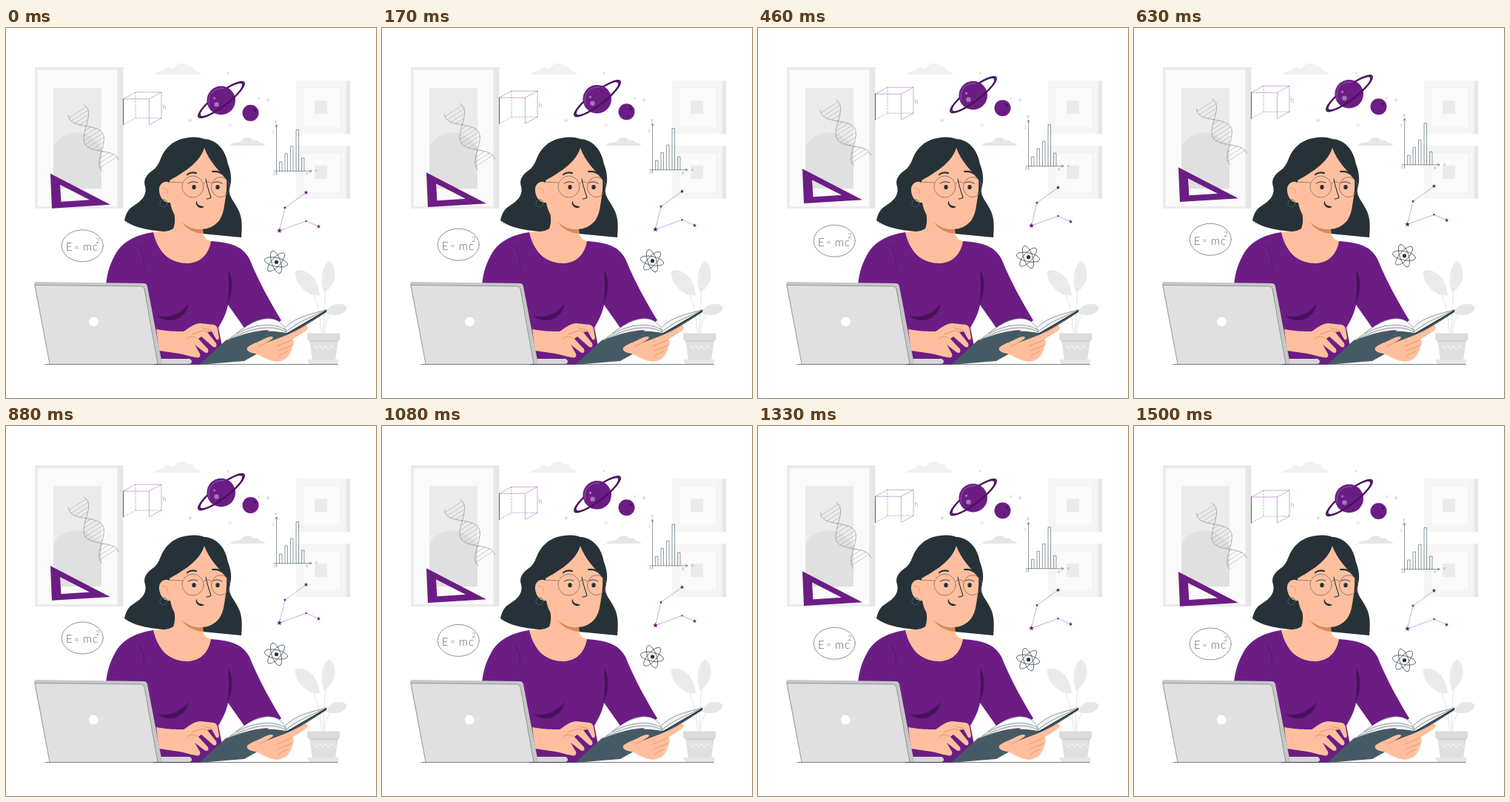
An HTML page with a canvas that plays this animation: 500x500 px, repeating every 1.54 s.

```html
<!DOCTYPE html>
<html lang="en">
<head>
<meta charset="utf-8">
<title>Studying</title>
<style>
  html, body { margin: 0; width: 100%; height: 100%; overflow: hidden; background: #fff; }
  canvas { display: block; width: 100vw; height: 100vh; }
</style>
</head>
<body>
<canvas id="stage" width="500" height="500"></canvas>
<script>
const ctx = document.getElementById('stage').getContext('2d');
const LOOP = 1540, STEPS = 37, PEAK = 708, LIFT = 9;
const PURPLE = '#6b1d84', DEEP = '#49125c', DARK = '#263238', SLATE = '#455a64';
const SKIN = '#ffbf9e', SHADE = '#dc8b5d', LILAC = '#a674ba';

ctx.lineCap = ctx.lineJoin = 'round';

function fill(color, path) {
  ctx.fillStyle = color;
  ctx.fill(new Path2D(path));
}

function line(color, width, path, dash = []) {
  ctx.strokeStyle = color;
  ctx.lineWidth = width;
  ctx.setLineDash(dash);
  ctx.stroke(new Path2D(path));
  ctx.setLineDash([]);
}

function rect(color, x, y, w, h) {
  ctx.fillStyle = color;
  ctx.fillRect(x, y, w, h);
}

function oval(x, y, rx, ry = rx, turn = 0) {
  ctx.beginPath();
  ctx.ellipse(x, y, rx, ry, turn, 0, Math.PI * 2);
}

function dot(color, ...shape) {
  oval(...shape);
  ctx.fillStyle = color;
  ctx.fill();
}

function ring(color, width, ...shape) {
  oval(...shape);
  ctx.strokeStyle = color;
  ctx.lineWidth = width;
  ctx.stroke();
}

function label(text, x, y, size, color) {
  ctx.font = `300 ${size}px Lato, sans-serif`;
  ctx.fillStyle = color;
  ctx.fillText(text, x, y);
}

function star(x, y, r) {
  ctx.beginPath();
  for (let i = 0; i < 10; i++) {
    const a = -Math.PI / 2 + i * Math.PI / 5, d = i % 2 ? r * 0.45 : r;
    ctx.lineTo(x + d * Math.cos(a), y + d * Math.sin(a));
  }
  ctx.fillStyle = PURPLE;
  ctx.fill();
}

function sparkle(x, y, r) {
  fill('#dedede', `M${x} ${y - r}Q${x} ${y} ${x + r} ${y}Q${x} ${y} ${x} ${y + r}Q${x} ${y} ${x - r} ${y}Q${x} ${y} ${x} ${y - r}Z`);
}

function smallFrame(y) {
  rect('#f5f5f5', 392, y, 68, 72);
  rect('#e6e6e6', 460, y, 5, 72);
  rect('#fafafa', 401, y + 10, 51, 52);
  line('#ebebeb', 0.6, `M392 ${y}L401 ${y + 10}H452L460 ${y}M401 ${y + 10}V${y + 62}L392 ${y + 72}M452 ${y + 10}V${y + 62}L460 ${y + 72}`);
  rect('#ebebeb', 417, y + 27, 17, 18);
}

function drawWall() {
  rect('#ebebeb', 39, 53, 113, 191);
  rect('#e6e6e6', 152, 53, 6.5, 191);
  rect('#fafafa', 43, 57, 107, 184);
  rect('#ebebeb', 64, 81, 65, 136);
  fill('#e0e0e0', 'M64 160C74 143 96 135 114 147Q124 153 129 163V217H64Z');
  smallFrame(71);
  smallFrame(159);
  fill('#f1f1f1', 'M200 63C202 58 211 60 214 55C218 52 224 54 227 55C231 46 242 46 247 52C251 51 254 54 255 58Q262 58 264 63Z');
  fill('#e6e6e6', 'M303 159C305 154 313 155 317 154C321 147 330 146 334 152C339 150 342 153 343 155Q349 155 350 159Z');
  sparkle(249, 124.5, 4.5);
  sparkle(354, 97, 4.5);
  for (const [x, y] of [[300.5, 61], [341.5, 95], [303, 131]]) dot('#dedede', x, y, 1.5);
}

function drawPlant() {
  line('#e0e0e0', 0.9, 'M405 338Q423 365 427 413M435 330Q429 370 429 413M454 376Q432 382 430 413');
  fill('#ebebeb', 'M391 329C399 323 421 332 424 361C408 364 389 345 391 329Z');
  fill('#ebebeb', 'M437 315C448 322 448 348 430 357C424 344 426 321 437 315Z');
  fill('#e6e6e6', 'M433 386C435 372 453 369 461 377C459 389 442 390 433 386Z');
  line('#e0e0e0', 0.5, 'M393 331L424 361M437 317L430 357M434 385L459 377');
  fill('#e0e0e0', 'M410 421H449L445 449H414Z');
  rect('#dcdcdc', 407, 412.5, 44, 9.5);
  rect('#d0d0d0', 410, 422, 39, 2);
  line('#f5f5f5', 1.2, 'M416 429L420 434L424 429L428 434L432 429L436 434L440 429L444 434');
  fill('#e6e6e6', 'M407 448H450L448 454H410Z');
}

function drawFigure() {
  fill(DARK, 'M268 150C258 145 234 147 222 158C207 171 210 183 200 191C189 198 185 206 188 214C191 227 182 234 173 240C164 245 162 252 160 260C172 270 198 275 230 276L266 278L318 283C319 270 320 256 313 244C309 235 300 228 302 216C306 206 304 194 300 184C297 166 286 151 268 150Z');
  fill(PURPLE, 'M199 276C178 279 160 287 150 302C142 315 136 330 135 350L190 400L200 455H262L292 430L287 405C296 390 299 380 300 374L324 408L340 420L372 395C358 372 342 344 329 312C321 297 308 290 277 288Z');
  fill(SKIN, 'M224 235C228 250 230 262 226 271C220 276 208 275 199 276C206 305 222 318 246 318C264 317 274 305 277 288C272 287 268 285 266 276L262 262Z');
  fill(SHADE, 'M236 260C246 270 256 272 266 272L267 278C254 277 243 272 236 260Z');
  fill(SKIN, 'M268 162C262 181 244 193 221 206V209C214 205 206 211 207 220C208 230 214 237 222 236C224 248 229 256 237 262C250 273 262 273 272 271C287 266 293 256 295 240C297 228 299 216 298 205C288 193 274 179 268 162Z');
  line(SHADE, 0.7, 'M211 216Q217 215 219 224');
  line(DARK, 2.2, 'M245 198Q250 194 257 196M279 194Q287 193 292 197');
  line(DARK, 0.9, 'M246 210Q252 206 259 209M280 209Q286 206 292 210');
  dot(DARK, 254, 215, 2.7, 3.1);
  dot(DARK, 286, 215, 2.7, 3.1);
  ring('#6d6560', 0.7, 252.5, 214.5, 14.5);
  ring('#6d6560', 0.7, 290, 215, 12.5, 13.5);
  line('#6d6560', 0.7, 'M267 210Q272 205 278 210M220 208L238 209');
  line(DARK, 1.1, 'M270 204C272 216 275 222 277 229Q275 231 271 231');
  fill(DARK, 'M258 234C258 239 262 241 268 241Q265 245 260 242C256 239 256 235 258 234Z');
  ring(SLATE, 1, 213, 237, 5);

  fill(DEEP, 'M204 389C221 393 235 386 247 373C243 393 222 402 204 389Z');
  fill(DEEP, 'M300 327C307 337 308 356 299 374C302 357 301 342 300 327Z');
  line(DEEP, 0.7, 'M178 292Q187 305 187 325');
}

function drawBook() {
  fill(SLATE, 'M261 455L297 422C325 409 352 407 379 412L433 381V384L381 417L322 450Z');
  fill('#f2f2f2', 'M297 423C312 414 326 397 350 393C365 391 376 399 379 411C352 404 322 412 297 423Z');
  fill('#fff', 'M316 410Q335 394 350 393C365 391 376 399 378 407C355 396 330 403 316 410Z');
  line(SLATE, 0.6, 'M297 423C312 414 326 397 350 393C365 391 376 399 379 411M312 413C335 400 362 397 378 408M303 420C330 406 358 399 379 411');
  fill('#f2f2f2', 'M378 404C394 389 414 386 433 381L380 412Z');
  line(SLATE, 0.6, 'M379 410C394 397 413 391 433 381M378 404C394 389 414 386 433 381');
  line(DARK, 1.4, 'M380 413L433 382');
}

function drawHands() {
  fill(SKIN, 'M203 407C218 410 230 410 240 410C248 405 253 400 262 399L281 401Q285 402 286 407L288 419Q286 424 283 419L278 410L272 411L284 426Q286 433 280 431L264 417L260 420L273 434Q275 441 268 438L255 428L262 440Q264 447 256 445C248 444 241 441 234 440L207 436Z');
  line(SHADE, 0.8, 'M251 414L266 409L273 411M264 405L278 409M244 420Q251 414 260 420');
  fill(SKIN, 'M326 432C331 427 340 425 349 420C360 414 365 418 357 422L350 426C370 419 390 411 403 403C409 401 409 407 404 410L387 421Q391 425 387 431C385 442 378 450 366 451C354 450 345 443 337 440Q324 438 326 432Z');
  line(SHADE, 0.8, 'M350 426L342 430M387 421L366 430M386 429L369 436M380 437L368 443');
}

function drawLaptop() {
  fill('#d6d6d6', 'M205 447H248Q251 448 251 451Q251 454 247 454H205Z');
  fill('#c7c7c7', 'M38 346Q38 343 41 343L186 345Q190 345 191 349L211 454H59Z');
  fill('#e0e0e0', 'M38 347L183 349Q186 349 187 353L205 454H59Z');
  line(SLATE, 0.5, 'M40 347.5L183 349Q186 349 187 353L205 454M39 347L59 454');
  dot('#fff', 118.3, 397, 6.5);
  line('#37474f', 0.7, 'M53 454.5H448');
}

// Half of a planet ring that is wide at its tips and thin along its sides.
function ringHalf(from) {
  ctx.beginPath();
  ctx.ellipse(291, 97, 39.5, 10, -0.65, from, from + Math.PI);
  ctx.ellipse(291, 97, 35, 7.6, -0.65, from + Math.PI, from, true);
  ctx.fillStyle = DEEP;
  ctx.fill();
}

function drawPlanets() {
  ringHalf(Math.PI);
  dot(PURPLE, 290.7, 98, 19.3);
  line(LILAC, 0.7, 'M275 105C271 91 281 80 294 82');
  dot(LILAC, 284.5, 103.5, 3.2);
  dot(LILAC, 281.5, 95, 1.6);
  ringHalf(0);
  dot(PURPLE, 330.5, 115, 11);
  dot(DEEP, 336.5, 111, 1.8);
  dot(DEEP, 333, 121, 1);
}

function drawCube() {
  line(LILAC, 0.6, 'M158.5 96L175 87H210L193.5 96H158.5M210 87V122L193.5 131V96');
  line(PURPLE, 0.8, 'M158.5 96V131');
  line(LILAC, 0.6, 'M175 87V122H210M175 122L158.5 131', [2, 2]);
  label('h', 211.5, 110, 9, LILAC);
}

function drawDna() {
  const strand = (u, side) => {
    const reach = side * 14 * Math.cos(Math.PI * (0.5 + (u - 0.29) / 0.45));
    return [95 + 46 * u + 0.84 * reach, 111 + 75 * u - 0.54 * reach];
  };
  ctx.strokeStyle = '#7b878c';
  ctx.lineWidth = 0.6;
  for (const side of [-1, 1]) {
    ctx.beginPath();
    for (let u = 0; u <= 1.001; u += 0.02) ctx.lineTo(...strand(u, side));
    ctx.stroke();
  }
  ctx.lineWidth = 0.4;
  for (let u = 0.04; u < 0.98; u += 0.06) {
    ctx.beginPath();
    ctx.moveTo(...strand(u, -1));
    ctx.lineTo(...strand(u, 1));
    ctx.stroke();
  }
}

function drawChart() {
  line(SLATE, 0.6, 'M365.5 198V131M363.8 134L365.5 131L367.2 134M362 193.5H413M410 191.8L413 193.5L410 195.2');
  const tops = [181, 170, 160, 137.5, 176];
  tops.forEach((top, i) => line(SLATE, 0.6, `M${369.5 + i * 7.5} 193.5V${top}h3.5V193.5`));
  label('y', 363.5, 128, 6, SLATE);
  label('1', 359.5, 143, 5, SLATE);
  label('0', 361, 199, 5, SLATE);
  label('x', 418, 194.5, 6, SLATE);
  label('A', 405, 199.5, 5, SLATE);
}

function drawConstellation() {
  line(LILAC, 0.6, 'M405.5 222.5L377 243L369.5 274L405.5 261L422.5 268.5');
  star(405.5, 222.5, 2.9);
  star(377, 243, 2.2);
  star(369.5, 274, 3.6);
  star(405.5, 261, 1.8);
  star(422.5, 268.5, 2.7);
}

function drawAtom() {
  for (const turn of [0.2, 1.25, 2.3]) ring(SLATE, 0.9, 365, 316.5, 16, 6, turn);
  dot(DARK, 365.5, 316.5, 2.6);
}

function drawFormula() {
  ring('#616161', 0.7, 103.3, 294.5, 28, 21.5);
  label('E', 81, 301.5, 15, '#616161');
  label('=', 92, 301, 12, '#616161');
  label('m', 104, 301.5, 15, '#616161');
  label('c', 117, 301.5, 15, '#616161');
  label('2', 121.5, 291, 9, '#616161');
}

function drawTriangle() {
  fill(PURPLE, 'M60 197L141 239L62 243.8ZM73 212L74.5 235L113 232.5Z');
}

function draw(t) {
  rect('#fff', 0, 0, 500, 500);
  for (const part of [drawWall, drawPlant, drawFigure, drawBook, drawHands, drawLaptop]) part();
  ctx.save();
  ctx.translate(0, -LIFT * (1 + Math.cos(2 * Math.PI * (t - PEAK) / LOOP)) / 2);
  for (const part of [drawPlanets, drawCube, drawDna, drawTriangle, drawChart, drawConstellation, drawAtom, drawFormula]) part();
  ctx.restore();
}

function tick(now) {
  // Each step is held; the small lead keeps its start on the 10 ms grid.
  const step = Math.floor((now % LOOP) / LOOP * STEPS + 0.15);
  draw(step * LOOP / STEPS);
  requestAnimationFrame(tick);
}

tick(0);
</script>
</body>
</html>
```
